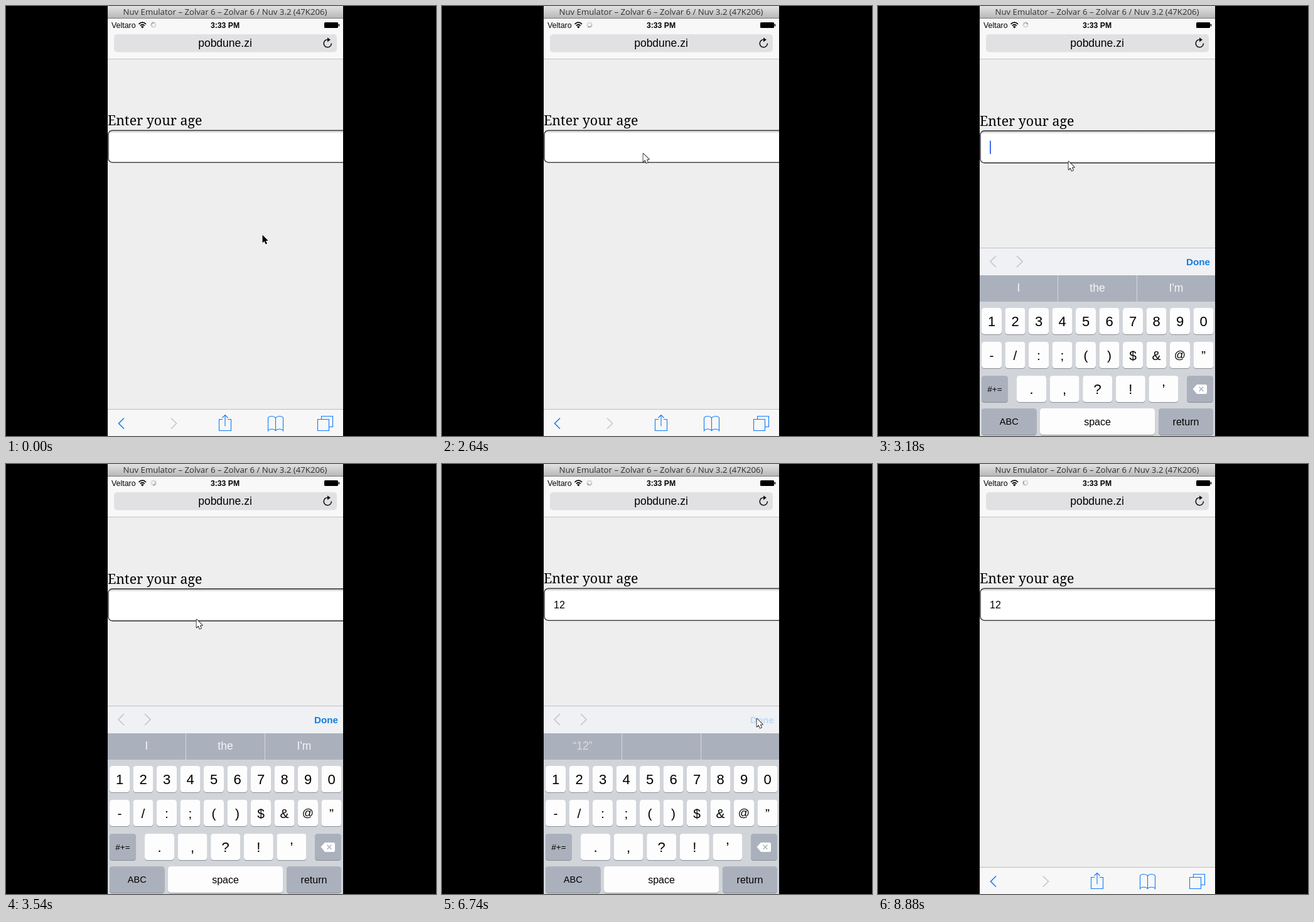
Recreate the animation shown at these times as an HTML page. Size 685 by 685 pixels, loop 8.96 s.

```html
<!DOCTYPE html>
<html lang="en">
<head>
<meta charset="utf-8">
<title>Age field</title>
<style>
  html, body { margin: 0; width: 100%; height: 100%; overflow: hidden; background: #000; }
  svg { display: block; width: 100vw; height: 100vh; }
  text { font-family: "Liberation Sans", Arial, sans-serif; white-space: pre; }
  .mid { text-anchor: middle; }
  .serif { font-family: "Noto Serif", Georgia, serif; }
  .title { font-family: "Open Sans", "Noto Sans", sans-serif; }
  .line { fill: none; stroke: #0f7bff; stroke-width: 1.1; }
  .dim { stroke: #c4c6ca; }
  .chevron { stroke-width: 1.6; }
  #cursor { paint-order: stroke; stroke-linejoin: round; }
</style>
</head>
<body>
<svg viewBox="0 0 685 685">
  <defs>
    <clipPath id="screen"><rect x="162" width="375" height="685"/></clipPath>
    <linearGradient id="chrome" x2="0" y2="1">
      <stop offset="0" stop-color="#e2e2e2"/><stop offset="1" stop-color="#b6b6b6"/>
    </linearGradient>
    <linearGradient id="inset" x2="0" y2="1">
      <stop offset="0" stop-color="#c9c9c9"/><stop offset="1" stop-color="#fff"/>
    </linearGradient>
  </defs>
  <rect width="685" height="685"/>

  <g clip-path="url(#screen)">
    <rect x="162" width="375" height="685" fill="#eee"/>

    <g id="form">
      <text class="serif" x="162" y="190" font-size="21.4">Enter your age</text>
      <rect x="163" y="198.2" width="420" height="51" rx="6.5" fill="#fff"/>
      <rect x="166" y="199" width="400" height="4" fill="url(#inset)"/>
      <rect x="163" y="198.2" width="420" height="51" rx="6.5" fill="none" stroke="#444" stroke-width="1.6"/>
      <text id="value" x="178" y="230" font-size="16"></text>
      <rect id="caret" y="214" width="2" height="21" fill="#426bf2"/>
    </g>

    <!-- browser header -->
    <rect x="162" y="20" width="375" height="64" fill="#f8f8f8"/>
    <rect x="162" y="84" width="375" height="1" fill="#c2c2c3"/>
    <rect x="162" width="375" height="20" fill="url(#chrome)"/>
    <rect x="162" y="19" width="375" height="1" fill="#777"/>
    <text class="title mid" x="349" y="13.6" font-size="13.2" fill="#2e2e2e">Nuv Emulator – Zolvar 6 – Zolvar 6 / Nuv 3.2 (47K206)</text>
    <text x="168" y="35" font-size="12.4">Veltaro</text>
    <g fill="none" stroke="#000" stroke-width="1.7">
      <path d="M211.5 28.8Q217.3 23.6 223 28.8M213.8 31.3Q217.3 28.2 220.8 31.3"/>
    </g>
    <path d="M215 33Q217.3 31 219.6 33L217.3 35.4Z"/>
    <g id="spinner" transform="translate(235 30)"></g>
    <text class="mid" x="349" y="35" font-size="12.2" font-weight="bold">3:33 PM</text>
    <rect x="507" y="26" width="22" height="9" rx="1.5"/>
    <rect x="529.6" y="28.5" width="1.6" height="4" rx=".8"/>
    <rect x="172" y="45" width="355" height="28.5" rx="5" fill="#e1e1e3"/>
    <text class="mid" x="349" y="65" font-size="17.5">pobdune.zi</text>
    <path d="M513 53.6A6.1 6.1 0 1 0 518.4 59.6" fill="none" stroke="#111" stroke-width="1.6"/>
    <path d="M512 50.3L517 53.8L512 57.3Z" fill="#111"/>

    <!-- browser footer -->
    <rect x="162" y="642" width="375" height="43" fill="#f7f7f7"/>
    <rect x="162" y="642" width="375" height="1" fill="#bdbdbe"/>
    <g class="line">
      <path class="chevron" d="M188 656.5L179.5 665L188 673.5"/>
      <path class="chevron dim" d="M263 656.5L271.5 665L263 673.5"/>
      <path d="M345 658.5H339.5V676.5H358.5V658.5H353M349 669.5V651.5M344.5 656L349 651.5L353.5 656"/>
      <path d="M429.5 656Q427 653.5 423.5 653.5Q419 653.5 417.5 656V676.5Q419 674 423.5 674Q427.5 674 429.5 676.5Q431.5 674 435.5 674Q440 674 441.5 676.5V656Q440 653.5 435.5 653.5Q432 653.5 429.5 656V676.5"/>
      <path d="M496.5 658.5H514.5V676.5H496.5ZM502.5 658.5V653.5H520.5V670.5H514.5"/>
    </g>

    <g id="keyboard">
      <rect x="162" y="385" width="375" height="44" fill="#eff1f4"/>
      <rect x="162" y="385" width="375" height="1" fill="#bfc1c4"/>
      <path class="line dim chevron" d="M188 398L179 407L188 416M221 398L230 407L221 416"/>
      <text id="done" x="491" y="413" font-size="15.2" font-weight="bold">Done</text>
      <rect x="162" y="429" width="375" height="42" fill="#abb1bc"/>
      <path d="M286.5 429V471M412.5 429V471" stroke="#d4d7dc"/>
      <g id="hints" class="mid" font-size="17.5"></g>
      <rect x="162" y="471" width="375" height="214" fill="#d1d5da"/>
      <g id="keys" class="mid"></g>
      <path d="M501.5 610L508 603H521.5Q524 603 524 605.5V615.5Q524 618 521.5 618H508Z" fill="#fff"/>
      <path d="M511.5 606.8L518.5 613.8M518.5 606.8L511.5 613.8" stroke="#abb1bc" stroke-width="1.4"/>
    </g>
  </g>

  <path id="cursor" d="M.5 .5V13.6L3.5 10.8L5.6 15.6L8 14.6L5.9 9.9H9.8Z"/>
</svg>
<script>
const LOOP = 8960, STEP = 177.6;
const $ = id => document.getElementById(id);
const NS = 'http://www.w3.org/2000/svg';

function add(parent, tag, attrs, text) {
  const el = document.createElementNS(NS, tag);
  for (const name in attrs) el.setAttribute(name, attrs[name]);
  if (text) el.textContent = text;
  parent.appendChild(el);
  return el;
}

function addKey(x, y, w, label, size, fill = '#fdfdfe') {
  add($('keys'), 'rect', { x, y: y + 1, width: w, height: 42, rx: 4.5, fill: '#8b8f95' });
  add($('keys'), 'rect', { x, y, width: w, height: 42, rx: 4.5, fill });
  add($('keys'), 'text', { x: x + w / 2, y: y + 21 + size * .36, 'font-size': size }, label);
}

const GREY = '#abb1bc';
[...'1234567890'].forEach((c, i) => addKey(165 + i * 37.5, 481, 32, c, 22));
[...'-/:;()$&@”'].forEach((c, i) => addKey(165 + i * 37.5, 535, 32, c, c === '@' ? 18 : 21));
[...'.,?!’'].forEach((c, i) => addKey(221 + i * 52.6, 589, 47, c, 22));
addKey(165, 589, 42, '#+=', 13.5, GREY);
addKey(492, 589, 42, '', 14, GREY);
addKey(165, 641, 87.5, 'ABC', 14.5, GREY);
addKey(258, 641, 183, 'space', 16);
addKey(447, 641, 87, 'return', 16, GREY);

const hints = [224, 349.5, 475].map(x => add($('hints'), 'text', { x, y: 455 }));
const spokes = Array.from({ length: 12 }, (_, i) => add($('spinner'), 'path', {
  d: 'M0 -2.4V-4.7', stroke: '#333', 'stroke-width': .9, transform: `rotate(${i * 30})`
}));

// rows: step, values...
const pointer = [
  [0, 408, 364], [1, 407, 413], [2, 371, 562], [4, 380, 430], [6, 391, 297],
  [9, 360, 260], [12, 322, 236], [15, 320, 234.5], [17, 303, 247], [30, 303, 247],
  [31, 340, 262], [34, 470, 400], [35, 498, 412], [36, 498, 407], [38, 501, 405],
  [43, 501, 405], [44, 515, 420], [46, 577, 600], [47, 577, 634]
];
const slide = [[16, 300], [17, 76], [18, 0], [38, 0], [39, 75], [40, 240], [41, 300]];

function at(rows, k) {
  const j = rows.findIndex(r => r[0] >= k);
  if (j < 0) return rows[rows.length - 1].slice(1);
  if (j === 0) return rows[0].slice(1);
  const a = rows[j - 1], b = rows[j], p = (k - a[0]) / (b[0] - a[0]);
  return a.slice(1).map((v, i) => v + (b[i + 1] - v) * p);
}

function draw(t) {
  const k = Math.floor((t + 31) / STEP);

  // a dark arrow at rest, a light one while recording the moves
  const [x, y] = at(pointer, k);
  const cursor = $('cursor');
  cursor.setAttribute('transform', `translate(${x} ${y})`);
  cursor.setAttribute('fill', k ? '#fff' : '#000');
  cursor.setAttribute('stroke', k ? '#111' : '#fff');
  cursor.setAttribute('stroke-width', k ? 1.6 : 2);
  cursor.style.display = k < 48 ? '' : 'none';

  const [drop] = at(slide, k);
  $('keyboard').setAttribute('transform', `translate(0 ${drop})`);
  $('keyboard').style.display = drop < 300 ? '' : 'none';
  $('form').setAttribute('transform', `translate(0 ${k > 16 && k < 25 ? .7 : 0})`);

  const typed = k < 26 ? '' : k < 28 ? '1' : '12';
  $('value').textContent = typed;
  const origin = k < 26 ? 17 : k < 28 ? 26 : 28;
  const focused = k >= 17 && k < 39;
  $('caret').setAttribute('x', 178 + typed.length * 8.6 - (typed ? 1 : 0));
  $('caret').style.display = focused && (k - origin) % 6 < 3 ? '' : 'none';

  const words = k < 26 ? ['I', 'the', "I'm"] : [k < 27 ? '“1”' : '“12”', '', ''];
  hints.forEach((h, i) => {
    h.textContent = words[i];
    h.setAttribute('fill', k < 26 ? '#f4f5f7' : '#d9dce1');
  });
  $('done').setAttribute('fill', k === 37 || k === 38 ? '#bcdaf6' : '#127fe0');

  const head = Math.floor(k * STEP * 12 / 1000);
  spokes.forEach((s, i) => {
    const age = ((head - i) % 12 + 12) % 12;
    s.setAttribute('opacity', Math.max(.28, .85 - age * .1));
  });
}

const start = performance.now();
function tick() {
  draw((performance.now() - start) % LOOP);
  requestAnimationFrame(tick);
}
tick();
</script>
</body>
</html>
```
